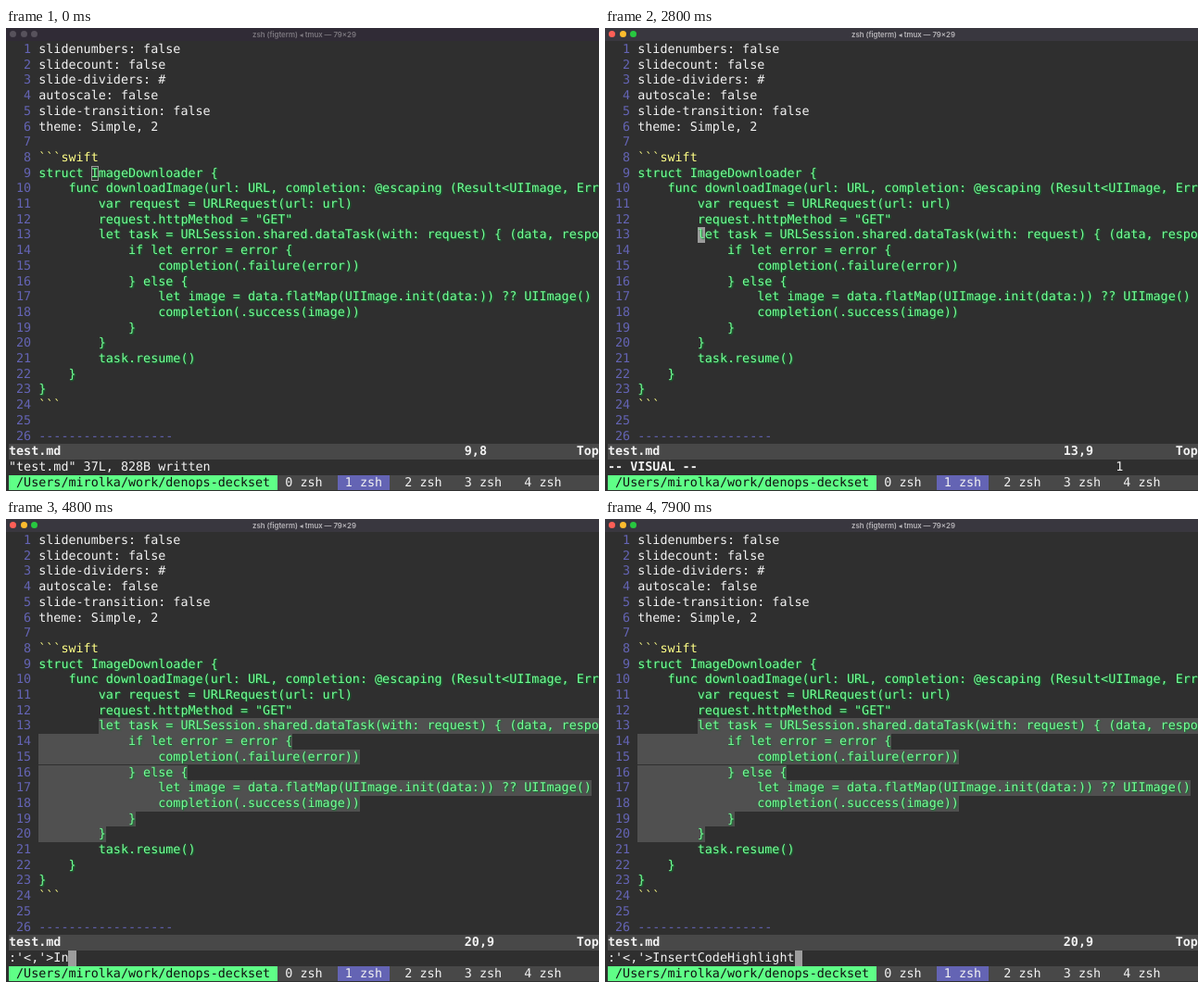
Write an HTML page that moves like this. It is 640x500 px and loops after 8 s.

```html
<!DOCTYPE html>
<html lang="en">
<head>
<meta charset="utf-8">
<style>
  html, body { margin: 0; width: 100%; height: 100%; overflow: hidden; background: #2f2f2f; }
  #bar { position: absolute; inset: 0 0 auto; height: 14px; background: #39373f; color: #b8b6ba;
    font: 600 7.8px/14px Inter, "DejaVu Sans", sans-serif; text-align: center; text-indent: 4px; }
  #bar i { position: absolute; top: 3.3px; width: 7.2px; height: 7.2px; border-radius: 50%; }
  #bar.idle { background: #302b36; color: #7c787f; }
  #bar.idle i { background: #57525c !important; }
  #term { position: absolute; left: 3px; top: 15px; color: #f2f2f2;
    font: 13.4px "DejaVu Sans Mono", monospace; text-rendering: geometricPrecision; }
  #term div { position: absolute; height: 16.7px; line-height: 18.7px; white-space: pre; }
  .num, .rule { color: #6464b4; }
  .code { color: #74ff96; text-shadow: 1px 1px 1.5px #0c7a2c; }
  .fence { color: #ffff87; }
  .bold { font-weight: bold; }
  #cursor { background: #9c9c9c; box-sizing: border-box; }
  #cursor.hollow { background: none; border: 1px solid #9c9c9c; }
</style>
</head>
<body>
<div id="bar" class="idle">
  <i style="left:4.3px;background:#ff5f57"></i><i style="left:15.8px;background:#febc2e"></i><i style="left:27.3px;background:#28c840"></i>zsh (figterm) ◂ tmux — 79×29
</div>
<div id="term"></div>
<script>
const lines = `slidenumbers: false
slidecount: false
slide-dividers: #
autoscale: false
slide-transition: false
theme: Simple, 2

\`\`\`swift
struct ImageDownloader {
    func downloadImage(url: URL, completion: @escaping (Result<UIImage, Err
        var request = URLRequest(url: url)
        request.httpMethod = "GET"
        let task = URLSession.shared.dataTask(with: request) { (data, respo
            if let error = error {
                completion(.failure(error))
            } else {
                let image = data.flatMap(UIImage.init(data:)) ?? UIImage()
                completion(.success(image))
            }
        }
        task.resume()
    }
}
\`\`\`

------------------`.split('\n');

const GUTTER = 4, COLS = 79, FIRST = 13, LAST = 20;
const term = document.getElementById('term'), bar = document.getElementById('bar');

// Places a box on the character grid; row counts from 1, col from 0.
function move(el, row, col, width) {
  el.style.top = (row - 1) * 16.7 + 'px';
  el.style.left = col + 'ch';
  if (width !== undefined) el.style.width = width + 'ch';
}
function cell(row, col, text, style = '', width, fill) {
  const el = term.appendChild(document.createElement('div'));
  el.className = style;
  el.textContent = text;
  if (fill) el.style.background = fill;
  move(el, row, col, width);
  return el;
}

cell(27, 0, '', '', COLS, '#484848');
cell(29, 0, '', '', COLS, '#484848');
const selection = [];
for (let r = FIRST; r <= LAST; r++) selection.push(cell(r, GUTTER, '', '', 0, '#505050'));
const cursor = cell(9, 11, '', '', 1);
cursor.id = 'cursor';

lines.forEach((line, i) => {
  const n = i + 1;
  const style = n == 8 || n == 24 ? 'fence' : n > 8 && n < 24 ? 'code' : n == 26 ? 'rule' : '';
  cell(n, 0, String(n).padStart(3), 'num');
  cell(n, GUTTER, line, style);
});
cell(27, 0, 'test.md', 'bold');
cell(27, 76, 'Top', 'bold');
const ruler = cell(27, 61, '', 'bold');
const message = cell(28, 0, '');
const count = cell(28, 68, '');
cell(29, 0, ' /Users/mirolka/work/denops-deckset ', '', 36, '#5fff87').style.color = '#111';
for (let i = 0; i < 5; i++) cell(29, 36 + 8 * i, ` ${i} zsh `, '', 7, i == 1 ? '#6464b4' : '');

// Key press times in ms.
const FOCUS = 100, RIGHT = 2600, VISUAL = 2700, COLON = 4100;
const downs = [1200, 1600, 2000, 2200, 2900, 3000, 3100, 3200, 3300, 3400, 3500];
const command = 'InsertCodeHighlight';
const keys = [4600, 4800, 5000, 5100, 5200, 5400, 5600, 5800, 5900, 6100,
  6400, 6600, 6700, 6800, 7000, 7100, 7200, 7300, 7500];
const passed = (times, t) => times.filter(x => x <= t).length;
const put = (el, text) => { if (el.textContent !== text) el.textContent = text; };

function draw(now) {
  const t = now % 8000;
  const row = 9 + passed(downs, t), col = t < RIGHT ? 7 : 8;
  const visual = t >= VISUAL, typing = t >= COLON;
  const text = ":'<,'>" + command.slice(0, passed(keys, t));

  bar.className = t < FOCUS ? 'idle' : '';
  cursor.className = t < FOCUS ? 'hollow' : '';
  typing ? move(cursor, 28, text.length) : move(cursor, row, GUTTER + col);

  selection.forEach((el, i) => {
    const r = FIRST + i;
    const from = i ? 0 : 8, to = r == row ? 9 : lines[r - 1].length;
    move(el, r, GUTTER + from, visual && r <= row ? to - from : 0);
  });

  put(ruler, `${row},${col + 1}`);
  put(message, typing ? text : visual ? '-- VISUAL --' : '"test.md" 37L, 828B written');
  message.className = visual && !typing ? 'bold' : '';
  put(count, visual && !typing ? String(row - FIRST + 1) : '');
  requestAnimationFrame(draw);
}
draw(0);
</script>
</body>
</html>
```
